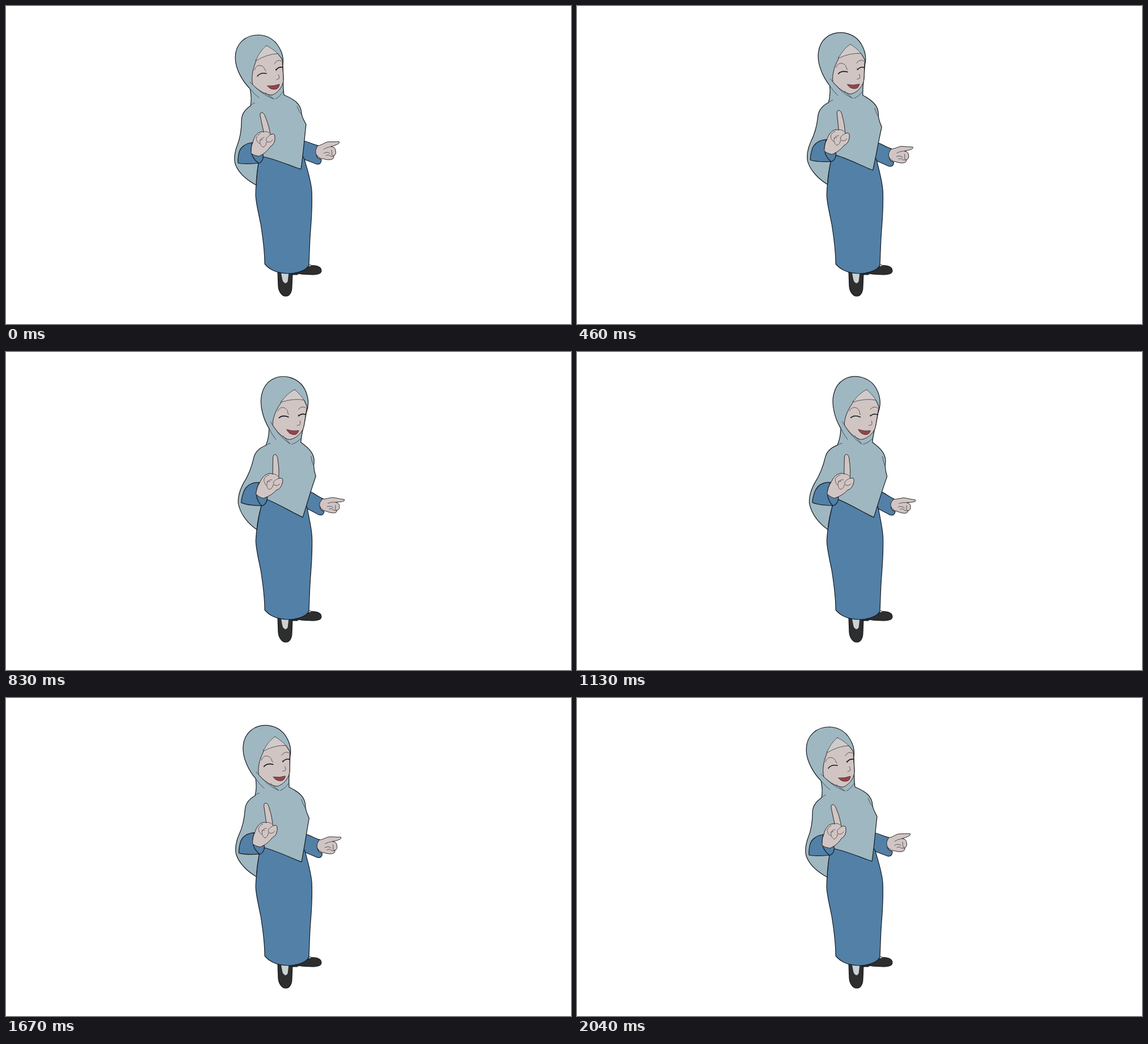
Recreate the animation shown at these times as an HTML page. Size 998 by 561 pixels, loop 2120 ms.

```html
<!DOCTYPE html>
<html lang="en">
<head>
<meta charset="utf-8">
<title>Swaying speaker</title>
<style>
html, body { margin: 0; width: 100%; height: 100%; overflow: hidden; background: #fff; }
svg { display: block; width: 100%; height: 100%; }
path { fill: none; stroke: #15191d; stroke-width: 1.2; stroke-linejoin: round; stroke-linecap: round; }
.veil { fill: #9fb7c1; }
.dress { fill: #5280a7; }
.skin { fill: #d1c5c4; stroke: #2a2828; stroke-width: 1; }
.cap { fill: #d0cbca; stroke: #454b50; stroke-width: .9; }
.shoe { fill: #2e2e2f; }
.sock { fill: #cbd1d2; stroke-width: .8; }
.mouth { fill: #97434c; stroke: #4a2528; stroke-width: .9; }
.fine { stroke: #4b4a4c; stroke-width: .9; }
.fold { stroke: #39464e; stroke-width: .9; }
.lid { stroke-width: 1.6; }
.bare { stroke: none; }
</style>
</head>
<body>
<svg viewBox="0 0 998 561">
  <!-- feet -->
  <path class="shoe" d="M505,468 L505,474 L514,474 L517,472 C523,474 530,473 540,474 C549,474 557,472 557,467 C557,459 546,457 536,458 Z"/>
  <path class="sock" d="M532,460 L536,456 L541,458 Q537,460 532,460 Z"/>
  <path class="shoe" d="M480,469 L481,495 C482,505 488,512 494,512 C501,512 505,505 505,495 L506,470 Z"/>
  <path class="sock" d="M485,469 C487,477 487,482 489,486 Q494,493 498,486 C499,480 499,476 500,470 Z"/>
  <!-- far arm -->
  <path class="dress" d="M526,238 C534,239 540,244 551,246 C547,252 546,262 551,268 L557,271 Q557,280 549,279 L520,268 Z"/>
  <path class="skin" d="M550,247 C556,246 561,242 567,240 C575,239 582,240 588,239 Q590,241 587,243 C582,246 577,247 574,248 Q582,249 582,255 Q584,262 579,264 Q580,270 573,271 C566,272 561,269 556,269 Q541,262 550,247 Z"/>
  <path class="fine" d="M574,248 Q566,249 561,253 M561,260 Q567,256 572,260 M575,254 L576,263 Q577,265 579,264 M565,264 Q570,261 573,265 L579,265"/>
  <!-- dress and veil -->
  <path class="dress" d="M446,272 C443,297 441,315 441,335 C442,350 446,365 450,385 C454,410 457,435 457,455 C463,462 473,471 498,472 C516,472 531,466 535,457 C536,440 536,420 538,395 C540,370 541,345 540,325 C538,304 530,282 527,270 L521,260 L455,256 Z"/>
  <path class="veil" d="M432,176 C420,184 416,192 416,202 C416,218 413,235 408,247 C404,258 402,268 405,279 C411,295 427,308 442,316 C442,303 444,289 446,276 L455,266 C478,271 500,281 521,288 C524,270 526,245 530,209 C525,199 523,197 522,189 C521,172 508,164 491,157 L464,148 Z"/>
  <path class="fold" d="M514,177 Q518,187 523,193"/>
  <!-- head -->
  <path class="veil bare" d="M432,176 C434,165 433,155 431,146 L490,140 L491,157 L495,172 L440,183 Z"/>
  <path class="veil" d="M432,176 C434,165 433,155 431,146 C420,135 405,113 405,91 C405,66 423,51 446,51 C469,52 480,66 486,80 C489,87 490,97 489,105 L490,128 C489,140 490,150 491,157"/>
  <path class="skin" d="M441,99 C435,113 433,128 436,139 C445,148 458,157 470,157 C479,154 488,144 490,132 C490,120 488,108 488,94 L480,84 Q462,83 442,94 Z"/>
  <path class="cap" d="M460,70 C452,76 446,85 441,97 Q460,85 480,84 L488,95 C485,87 474,77 460,70 Z"/>
  <path class="fold" d="M431,134 C444,148 457,158 473,164 M458,153 L473,164 M490,150 Q484,160 476,164 M431,146 Q438,155 447,162 M432,176 Q435,172 439,171"/>
  <path class="fine" d="M439,113 C441,104 450,102 456,109 M456,110 L459,115 M474,102 Q479,93 487,97 M476,111 L477,114 M481,121 Q484,127 482,128 L478,130"/>
  <path class="lid" d="M444,124 Q449,117 460,119 M477,113 Q481,107 488,108"/>
  <path class="mouth" d="M462,141 Q473,142 483,138 Q482,147 474,147 Q466,147 462,141 Z"/>
  <!-- near arm -->
  <path class="dress" d="M435,241 C425,242 413,248 411,261 Q409,272 410,277 C422,280 438,278 448,277 C453,274 455,269 454,262 L440,262 Z"/>
  <path d="M435,241 C431,254 432,267 446,277"/>
  <path class="skin" d="M455,222 L449,194 Q448,187 453,188 Q457,190 459,198 C463,207 465,216 467,227 Q475,223 475,231 Q476,243 467,248 C461,257 455,261 447,265 Q438,264 433,260 C433,253 433,246 436,241 C438,229 446,220 455,222 Z"/>
  <path class="fine" d="M455,222 Q460,220 465,224 M449,225 C439,231 441,238 448,243 M456,232 C447,233 446,244 454,249 Q460,247 460,240 M448,237 Q451,234 453,236 M467,227 C460,232 457,236 462,240 Q468,241 471,236"/>
</svg>
<script>
const LOOP = 2120, FPS = 24, PEAK = 1000, END = 2040;
const AXIS = 490, BASE = 365, RAMP = 150, TURN = .24;
const paths = [...document.querySelectorAll('path')].map(el => [el, el.getAttribute('d')]);

const ease = u => (1 - Math.cos(Math.PI * u)) / 2;

// Sideways lean: 0 far left, 1 far right
const lean = t => t < PEAK ? ease(t / PEAK) : ease(Math.max(0, (END - t) / (END - PEAK)));

// Bends a point around the spine; the turn grows smoothly above the hips
function bend(x, y, amount) {
  const rise = Math.max(0, (BASE - y) / RAMP), u = Math.min(1, rise);
  const turn = TURN * u * u * (3 - 2 * u) * amount;
  const shift = TURN * RAMP * (u ** 3 - u ** 4 / 2 + rise - u) * amount;
  const shrink = turn * turn / 2;
  const dx = shift - shrink * (x - AXIS);
  const dy = turn * (x - AXIS) + shrink * .55 * Math.max(0, 300 - y);
  return (x + dx).toFixed(2) + ',' + (y + dy).toFixed(2);
}

function draw(now) {
  const step = Math.floor((now % LOOP + 5) * FPS / 1000);
  const amount = lean(step * 1000 / FPS);
  for (const [el, d] of paths)
    el.setAttribute('d', d.replace(/(\d+),(\d+)/g, (_, x, y) => bend(+x, +y, amount)));
}

const start = performance.now();
function tick() {
  draw(performance.now() - start);
  requestAnimationFrame(tick);
}
tick();
</script>
</body>
</html>
```
